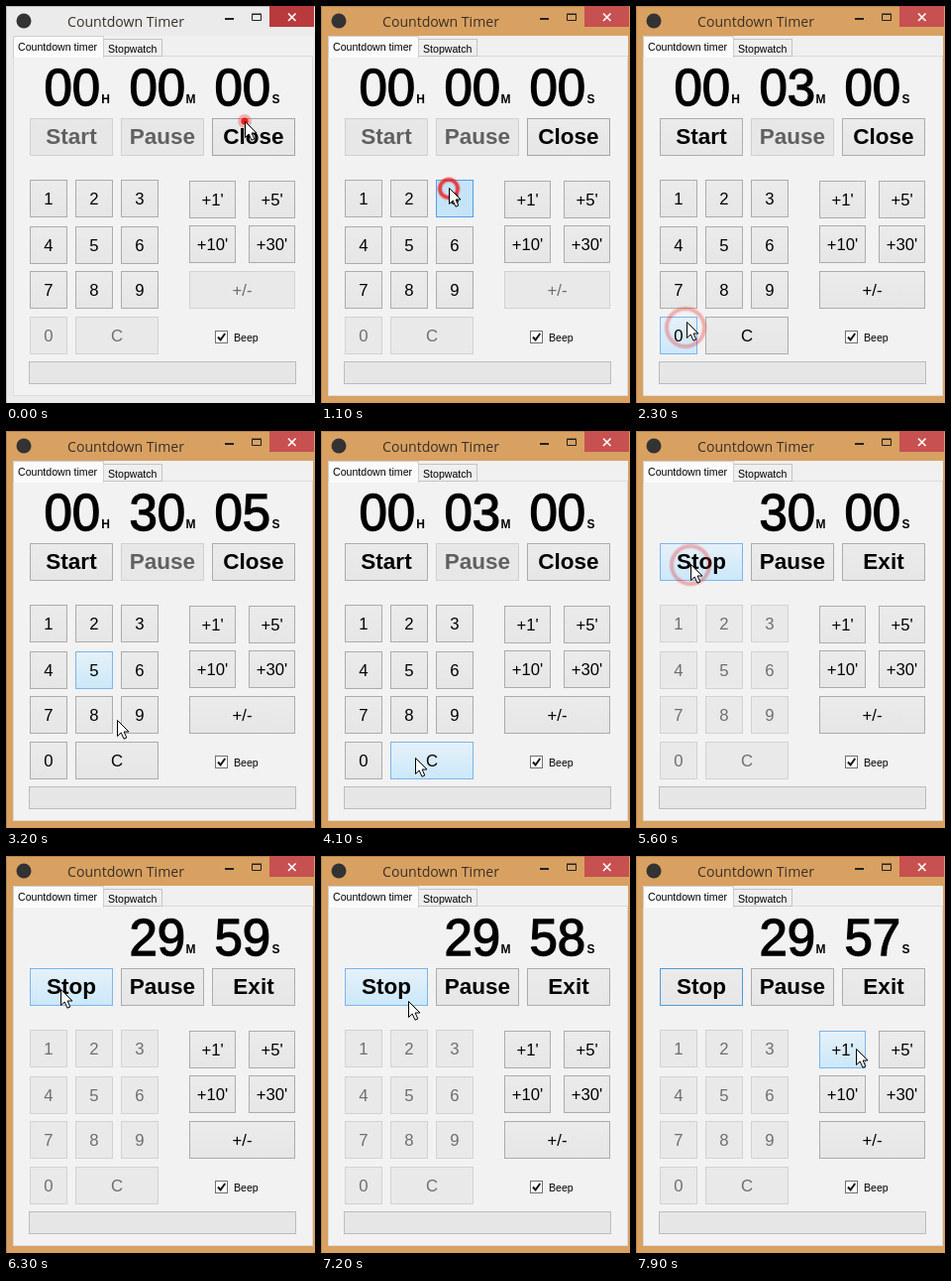
Recreate the animation shown at these times as an HTML page. Size 312 by 400 pixels, loop 8 s.

```html
<!DOCTYPE html>
<html lang="en">
<head>
<meta charset="utf-8">
<title>Countdown Timer</title>
<style>
  html, body { margin: 0; width: 100%; height: 100%; overflow: hidden; }
  svg { display: block; width: 312px; height: 400px; }
  text { font-family: "Liberation Sans", Arial, sans-serif; fill: #000; }
  .title { font: 14.1px "Open Sans", "Noto Sans", sans-serif; fill: #3a3026; }
  .small { font-size: 10.6px; }
  .digits { font-size: 51px; stroke: #000; stroke-width: 1.3; }
  .unit { font-size: 12px; font-weight: bold; text-anchor: middle; }
  .key text { font-size: 16.7px; text-anchor: middle; }
  .key.big text { font-size: 22.5px; font-weight: bold; }
  .key rect { fill: url(#face); stroke: #acacac; }
  .key.off rect { fill: #e9e9e9; stroke: #d2d2d2; }
  .key.off text { fill: #6e6e6e; }
  .key.big.off rect { fill: #e7e7e7; stroke: #d0d0d0; }
  .key.big.off text { fill: #606060; }
  .key.default rect { stroke: #a0a6ac; }
  .key.focus rect { stroke: #4f9bd6; }
  .key.hover rect { fill: url(#glow); stroke: #7eb4ea; }
  .key.down rect { fill: #c6e4f8; stroke: #569de5; }
</style>
</head>
<body>
<svg id="stage" viewBox="0 0 312 400">
  <defs>
    <linearGradient id="face" x2="0" y2="1">
      <stop stop-color="#ebebeb"/><stop offset="1" stop-color="#e6e6e6"/>
    </linearGradient>
    <linearGradient id="glow" x2="0" y2="1">
      <stop stop-color="#e6f1f9"/><stop offset="1" stop-color="#cbe8f9"/>
    </linearGradient>
  </defs>

  <rect id="frame" width="312" height="400"/>
  <path id="edge" d="M.5 400V.5H312" fill="none"/>
  <circle cx="18" cy="15" r="7.5" fill="#333"/>
  <text class="title" x="62" y="21">Countdown Timer</text>
  <path d="M221 13h9" stroke="#222" stroke-width="2"/>
  <path d="M248.5 8.5h9v6h-9zM248 8h10" fill="none" stroke="#222"/>
  <rect id="close" x="266" width="45" height="21"/>
  <path d="M285 7.5l7.5 7.5m0-7.5l-7.5 7.5" stroke="#fff" stroke-width="1.7"/>

  <rect x="7" y="30" width="303" height="363" fill="#f0f0f0"/>
  <rect x="7.5" y="50.5" width="302" height="342" fill="#f2f2f2" stroke="#dcdcdc"/>
  <rect x="98.5" y="33.5" width="59" height="17" fill="#efefef" stroke="#c4c4c4"/>
  <path d="M7.5 52V30.5h91V52" fill="#fbfbfb" stroke="#cfcfcf"/>
  <text class="small" x="12" y="45">Countdown timer</text>
  <text class="small" x="103" y="47">Stopwatch</text>

  <g id="clock"></g>
  <g id="keys"></g>

  <rect x="211.5" y="327.5" width="12" height="12" fill="#fff" stroke="#707070"/>
  <path d="M214 333.5l2.6 3 4.6-6.5" fill="none" stroke="#111" stroke-width="2"/>
  <text class="small" x="230" y="338">Beep</text>
  <rect x="23.5" y="358.5" width="269" height="22" fill="#e6e6e6" stroke="#bcbcbc"/>

  <g id="ripple">
    <circle id="halo" fill="none" stroke="#f24a4a" stroke-width="6" opacity=".4"/>
    <circle id="ring" fill="none" stroke="#e81c1c" stroke-width="3.4"/>
    <circle id="dot" r="3.6" fill="#f01010"/>
  </g>
  <path id="cursor" d="M.5 .5V16.5L4.2 13 7 19.2 9.8 18 7.1 12H12z"
        fill="#fff" stroke="#000" stroke-linejoin="round"/>
</svg>

<script>
const LOOP = 8000, STEP = 100;
const ACTIVATE = 1000, READY = 1200, RUN = 5500;
const $ = id => document.getElementById(id);

function make(parent, tag, attrs, label = "") {
  const node = document.createElementNS("http://www.w3.org/2000/svg", tag);
  for (const k in attrs) node.setAttribute(k, attrs[k]);
  node.textContent = label;
  return parent.appendChild(node);
}

// Buttons
const keys = {};
function addKey(label, x, y, w = 38, h = 38, big = false) {
  const g = make($("keys"), "g", {});
  make(g, "rect", { x: x + .5, y: y + .5, width: w - 1, height: h - 1 });
  const text = make(g, "text", { x: x + w / 2, y: y + h / 2 + (big ? 7 : 6) }, label);
  keys[label] = { g, text, x, y, w, h, big };
}
["Start", "Pause", "Close"].forEach((s, i) => addKey(s, 24 + 92 * i, 113, 84, 38, true));
const rows = [175, 222, 267, 313];
for (let n = 1; n <= 9; n++) addKey(String(n), 24 + 46 * ((n - 1) % 3), rows[Math.floor((n - 1) / 3)]);
addKey("0", 24, 313);
addKey("C", 70, 313, 84);
addKey("+1'", 185, 176, 47);
addKey("+5'", 245, 176, 47);
addKey("+10'", 185, 221, 47);
addKey("+30'", 245, 221, 47);
addKey("+/-", 185, 267, 107);

// Clock
const clock = ["H", "M", "S"].map((unit, i) => {
  const g = make($("clock"), "g", {});
  const x = 38.5 + 86 * i;
  const digits = make(g, "text", { class: "digits", x, y: 99.5 });
  make(g, "text", { class: "unit", x: x + 62, y: 98 }, unit);
  return { g, digits };
});

// Time, x, y of the pointer
const path = [
  [0, 241, 116], [200, 241, 116], [900, 129, 183], [1200, 129, 183],
  [1500, 50, 324], [2100, 50, 324], [2300, 51, 318], [2600, 90, 243],
  [3100, 95, 252], [3200, 112, 291], [3500, 115, 330], [3900, 115, 330],
  [4500, 37, 326], [4700, 37, 326], [5000, 55, 199], [5200, 55, 134],
  [7000, 55, 134], [7700, 222, 194], [LOOP, 222, 194]
];
const clicks = [
  [0, "Close", 241, 116], [1000, "3", 129, 184], [1500, "0", 50, 324],
  [2000, "0", 50, 324], [2600, "5", 90, 243], [3600, "C", 115, 330],
  [4600, "0", 37, 326], [5300, "Start", 55, 135]
];
const readings = [
  [0, "000000"], [1200, "000003"], [1700, "000030"], [2200, "000300"],
  [2800, "003005"], [3800, "000300"], [4800, "003000"],
  [5800, "002959"], [6800, "002958"], [7800, "002957"]
];

const latest = (list, t) => list.filter(e => e[0] <= t).pop();

function pointer(t) {
  t = Math.max(0, t);
  const i = path.findIndex(p => p[0] > t);
  const [a, b] = [path[i - 1], path[i]];
  const u = (t - a[0]) / (b[0] - a[0]), e = u * u * (3 - 2 * u);
  return [a[1] + (b[1] - a[1]) * e, a[2] + (b[2] - a[2]) * e];
}

function isOff(name, t) {
  if (t < READY) return ["Start", "Pause", "0", "C", "+/-"].includes(name);
  if (t < RUN) return name === "Pause";
  return /^[0-9C]$/.test(name);
}

function drawKeys(t) {
  const [hx, hy] = pointer(t - STEP);   // highlight trails the pointer
  const click = latest(clicks, t);
  const focus = t < READY ? "Close" : click[1];
  for (const name in keys) {
    const k = keys[name], off = isOff(name, t);
    const over = hx >= k.x && hx < k.x + k.w && hy >= k.y && hy < k.y + k.h;
    const states = {
      key: true, big: k.big, off,
      default: name === focus && t < READY,
      focus: name === focus && t >= READY && !off,
      hover: over && !off && t >= ACTIVATE,
      down: name === click[1] && !off && t >= ACTIVATE && t - click[0] < 200
    };
    k.g.setAttribute("class", Object.keys(states).filter(s => states[s]).join(" "));
  }
  keys.Start.text.textContent = t < RUN ? "Start" : "Stop";
  keys.Close.text.textContent = t < RUN ? "Close" : "Exit";
}

function drawRipple(t) {
  const [start, , x, y] = latest(clicks, t);
  const n = (t - start) / STEP, r = 4 + 5 * n;
  $("ripple").setAttribute("transform", `translate(${x} ${y})`);
  $("ripple").setAttribute("opacity", n > 4 ? 0 : [.95, .8, .5, .3, .15][n]);
  $("ring").setAttribute("r", r);
  $("halo").setAttribute("r", r);
  $("ring").setAttribute("opacity", n ? 1 : 0);
  $("dot").setAttribute("opacity", n ? 0 : 1);
}

function draw(t) {
  const active = t >= ACTIVATE;
  $("frame").setAttribute("fill", active ? "#d8a162" : "#ebebeb");
  $("edge").setAttribute("stroke", active ? "#b98a50" : "#c2c2c2");
  $("close").setAttribute("fill", active ? "#c75050" : "#b83a3c");

  const value = latest(readings, t)[1];
  clock.forEach((part, i) => part.digits.textContent = value.slice(2 * i, 2 * i + 2));
  clock[0].g.setAttribute("visibility", t < RUN ? "visible" : "hidden");

  drawKeys(t);
  drawRipple(t);
  const [x, y] = pointer(t);
  $("cursor").setAttribute("transform", `translate(${Math.round(x)} ${Math.round(y)})`);
}

const begin = performance.now();
function tick() {
  const t = (performance.now() - begin) % LOOP;
  draw(Math.floor(t / STEP) * STEP);
  requestAnimationFrame(tick);
}
tick();
</script>
</body>
</html>
```
